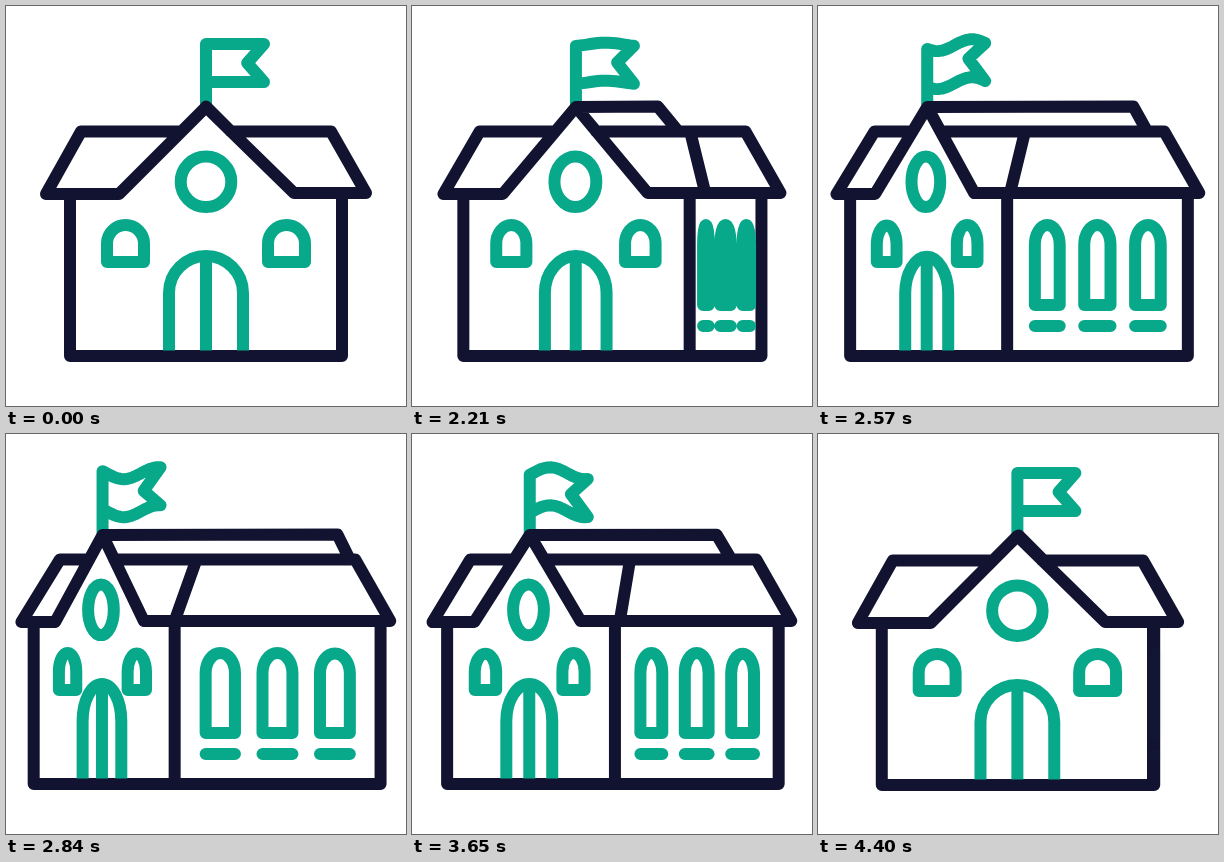
Recreate the animation shown at these times as an HTML page. Size 400 px wide and 400 px high, loop 4430 ms.

```html
<!DOCTYPE html>
<html lang="en">
<head>
<meta charset="utf-8">
<title>School</title>
<style>
  html, body { margin: 0; width: 100%; height: 100%; overflow: hidden; background: #fff; }
  svg { display: block; width: 100vw; height: 100vh; }
  path, ellipse { fill: none; stroke-width: 12; stroke-linecap: round; stroke-linejoin: round; }
  .teal { stroke: #08a88a; }
  .dark { stroke: #121331; }
  .butt { stroke-linecap: butt; }
</style>
</head>
<body>
<svg viewBox="0 0 400 400">
  <g id="school">
    <path id="flag" class="teal"/>
    <path id="walls" class="dark"/>
    <path id="roof" class="dark"/>
    <ellipse id="rose" class="teal" cy="175.8" ry="25.3"/>
    <path id="front" class="teal"/>
    <path id="door" class="teal butt"/>
    <path id="side" class="teal"/>
  </g>
</svg>
<script>
const LOOP = 4430;
const $ = id => document.getElementById(id);
const clamp = v => Math.min(1, Math.max(0, v));
const smooth = v => (v = clamp(v), v * v * (3 - 2 * v));
const n = v => v.toFixed(2);
const line = (...pts) => 'M' + pts.map(([x, y]) => n(x) + ' ' + n(y)).join('L');

// cubic-bezier(.2, 0, .2, 1)
function ease(x) {
  x = clamp(x);
  let lo = 0, hi = 1;
  for (let i = 0; i < 24; i++) {
    const s = (lo + hi) / 2;
    if (0.6 * s * (1 - s) + s * s * s < x) lo = s; else hi = s;
  }
  return smooth(lo);
}

// Arched opening; the arch keeps its height while the width changes
function arch(l, r, top, rise, bottom, close) {
  const rx = n(Math.max(0.01, (r - l) / 2));
  return `M${n(l)} ${bottom}V${top + rise}A${rx} ${rise} 0 0 1 ${n(r)} ${top + rise}V${bottom}${close}`;
}

function flagPath(x, t) {
  const amp = 6 * smooth((t - 2000) / 600) * smooth((4200 - t) / 300);
  const crest = 0.62 + 0.72 * (t - 2360) / 1000;
  const point = (u, y) =>
    [x + 58 * u, y + amp * (0.2 - Math.cos(2 * Math.PI * (u - crest) / 1.2))];
  const pts = [[x, 99]];
  for (let i = 0; i <= 16; i++) pts.push(point(i / 16, 38));
  pts.push(point(0.71, 57));
  for (let i = 16; i >= 0; i--) pts.push(point(i / 16, 76));
  return line(...pts);
}

function draw(t) {
  const p = ease((t - 2003) / 1020) * (1 - ease((t - 3495) / 1010));
  const at = (x, dx) => x + dx * p;

  const left = at(64, -37), corner = at(336, -170.5), right = at(336, 39.3);
  $('walls').setAttribute('d',
    line([left, 188], [left, 350], [right, 350], [right, 187]) +
    line([corner, 187], [corner, 350]));

  const apex = at(200, -105.4), baseL = at(113, -65), baseR = at(288, -153);
  const k = 24.5 / 87;
  const eave = at(360, 24.7);
  $('roof').setAttribute('d',
    line([apex + (baseL - apex) * k, 125.5], [at(75, -21.5), 125.5],
      [at(40, -25), 188], [baseL, 188], [apex, 101], [baseR, 187],
      [eave, 187], [at(325, 24.7), 125.5], [apex + (baseR - apex) * k, 125.5]) +
    line([at(325, -137), 125.5], [at(360, -195), 187]) +
    line([apex, 101], [at(200, 134), 100.6], [at(225, 121), 125.5]));

  $('flag').setAttribute('d', flagPath(apex, t));
  $('rose').setAttribute('cx', n(at(200, -107)));
  $('rose').setAttribute('rx', n(at(25.3, -12.7)));

  $('front').setAttribute('d',
    arch(at(101, -49), at(138, -69), 219, 18.5, 256, 'Z') +
    arch(at(262, -143), at(299, -162), 219, 18.5, 256, 'Z'));

  const mid = at(200, -106);
  $('door').setAttribute('d',
    arch(at(163, -88), at(237, -124), 250, 37, 344.5, '') + line([mid, 250], [mid, 344.5]));

  const panes = [[340, -143, 333, -106], [336, -81, 336, -50.5], [339.5, -26, 335, 9]];
  $('side').setAttribute('d', panes.map(([a, da, b, db]) => {
    const l = at(a, da), r = Math.max(l + 0.1, at(b, db));
    return arch(l, r, 219, 20, 299, 'Z') + line([l, 320], [r, 320]);
  }).join(''));
  $('side').setAttribute('opacity', n(clamp((p - 0.004) / 0.12)));

  // The whole building settles slightly lower on the way back
  $('school').setAttribute('transform', `translate(0 ${n(0.9 * smooth((t - 3600) / 300))})`);
}

const start = performance.now();
function tick() {
  draw((performance.now() - start) % LOOP);
  requestAnimationFrame(tick);
}
tick();
</script>
</body>
</html>
```
